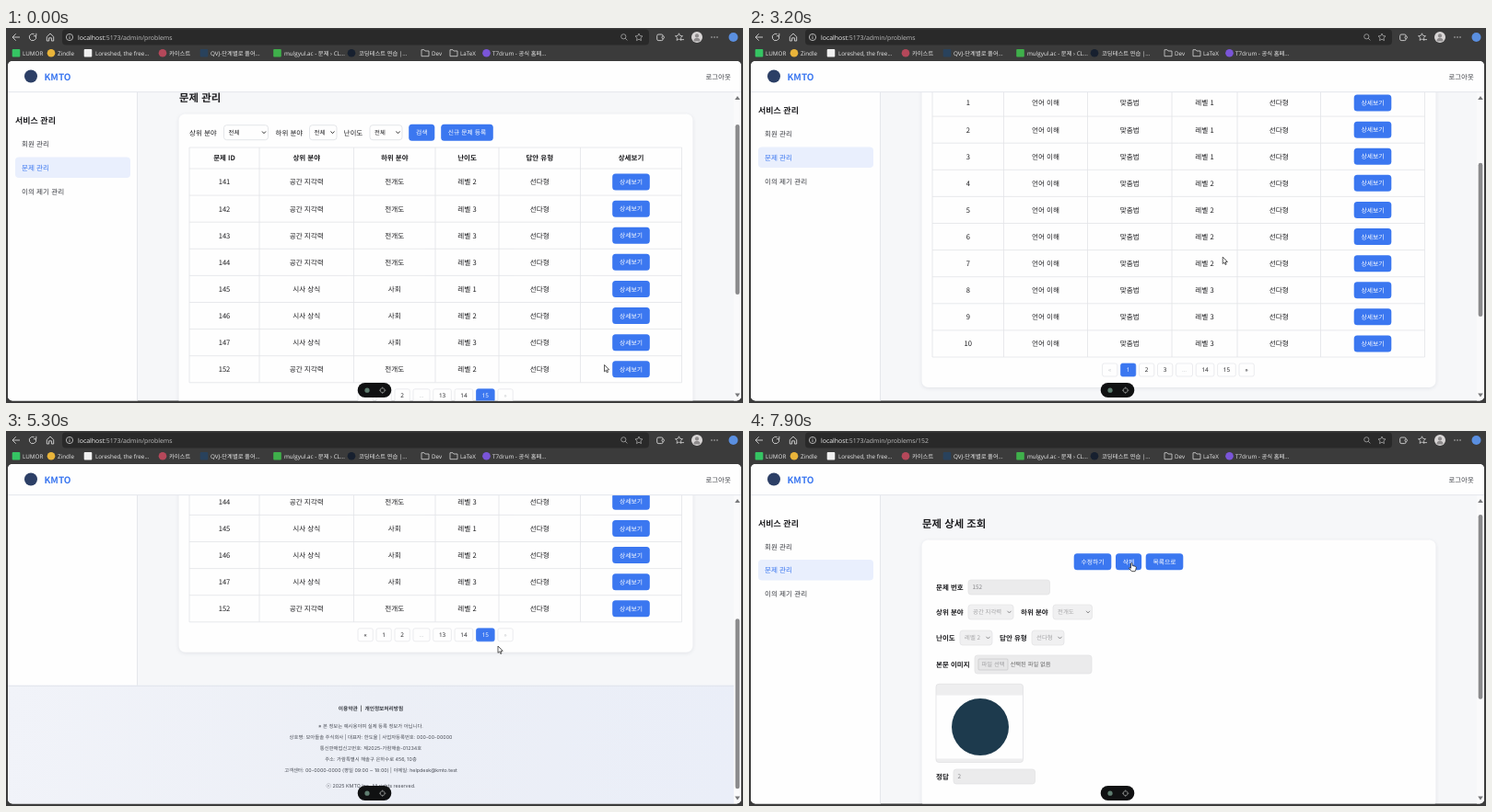
An HTML page with a canvas that plays this animation: 800 px wide and 408 px high, repeating every 8000 ms.

```html
<!DOCTYPE html>
<html lang="ko">
<head>
<meta charset="utf-8">
<title>문제 관리</title>
<style>
html, body { margin: 0; width: 100%; height: 100%; overflow: hidden; background: #3b3b3b; }
canvas { display: block; width: 800px; height: 408px; }
</style>
</head>
<body>
<canvas id="stage" width="800" height="408"></canvas>
<script>
const ctx = document.getElementById('stage').getContext('2d');
ctx.textRendering = 'geometricPrecision'; // keeps fractional glyph advances
const LOOP = 8000;
const PAGE_FONT = '"Noto Sans CJK KR", "Noto Sans CJK JP", "Noto Sans CJK", "Noto Sans", sans-serif';
const UI_FONT = '"Open Sans", "Noto Sans CJK KR", "Noto Sans CJK", sans-serif';
const FOOT_FONT = 'Inter, "Noto Sans CJK KR", "Noto Sans CJK", sans-serif';
const BLUE = '#3b77f0', INK = '#1c1c1f', LINE = '#e2e4e8', PAPER = '#fefefe';
const TAU = Math.PI * 2;

let hot = []; // clickable areas of the current picture

// ---------- drawing helpers ----------
function text(s, x, y, size, o = {}) {
  ctx.font = `${o.weight || 400} ${size}px ${o.font || PAGE_FONT}`;
  ctx.textAlign = o.align || 'left';
  ctx.fillStyle = o.color || INK;
  ctx.fillText(s, x, y + size * 0.385);
}

function box(x, y, w, h, r, fill, stroke, lw = 0.7) {
  ctx.beginPath();
  ctx.roundRect(x, y, w, h, r);
  if (fill) { ctx.fillStyle = fill; ctx.fill(); }
  if (stroke) { ctx.strokeStyle = stroke; ctx.lineWidth = lw; ctx.stroke(); }
}

function rect(x, y, w, h, fill) {
  ctx.fillStyle = fill;
  ctx.fillRect(x, y, w, h);
}

function disc(x, y, r, fill, stroke, lw = 1) {
  ctx.beginPath();
  ctx.arc(x, y, r, 0, TAU);
  if (fill) { ctx.fillStyle = fill; ctx.fill(); }
  if (stroke) { ctx.strokeStyle = stroke; ctx.lineWidth = lw; ctx.stroke(); }
}

function poly(points, stroke, lw = 1, fill, close) {
  ctx.beginPath();
  points.forEach(([x, y], i) => i ? ctx.lineTo(x, y) : ctx.moveTo(x, y));
  if (close) ctx.closePath();
  if (fill) { ctx.fillStyle = fill; ctx.fill(); }
  if (stroke) { ctx.strokeStyle = stroke; ctx.lineWidth = lw; ctx.stroke(); }
}

function star(x, y, r, color) {
  const pts = Array.from({ length: 10 }, (_, i) => {
    const a = -Math.PI / 2 + i * Math.PI / 5, d = i % 2 ? r * 0.48 : r;
    return [x + d * Math.cos(a), y + d * Math.sin(a)];
  });
  poly(pts, color, 0.8, null, true);
}

function button(label, x, y, w) {
  const area = [x - 0.3, y - 9, w + 0.6, 18];
  box(...area, 3.5, BLUE);
  text(label, x + w / 2, y, 6.8, { color: '#fff', align: 'center', weight: 500 });
  hot.push(area);
}

function select(label, x, y, w, off) {
  box(x, y - 8, w, 16, 3, off ? '#f0f0f1' : PAPER, off ? '#e2e2e4' : '#d9dbe0');
  text(label, x + 5, y, 6.4, { color: off ? '#a5a5a7' : INK });
  poly([[x + w - 6.5, y - 1.2], [x + w - 4.5, y + 1], [x + w - 2.5, y - 1.2]], off ? '#8c8c8e' : '#333', 1);
}

function input(value, x, y, w) {
  box(x, y - 8, w, 16, 3, '#ebebec', '#e1e1e3');
  text(value, x + 4.5, y, 6.4, { color: '#858588' });
}

function card(top, bottom) {
  ctx.save();
  ctx.shadowColor = 'rgba(40,50,80,.1)';
  ctx.shadowBlur = 4;
  ctx.shadowOffsetY = 1;
  box(187.5, top, 558, bottom - top, 7, PAPER);
  ctx.restore();
}

// ---------- pages ----------
const lastRows = [141, 142, 143, 144, 145, 146, 147, 152].map((id, i) => {
  const news = i > 3 && i < 7;
  return [id, news ? '시사 상식' : '공간 지각력', news ? '사회' : '전개도', '레벨 ' + '23331232'[i]];
});
const firstRows = Array.from({ length: 10 }, (_, i) =>
  [i + 1, '언어 이해', '맞춤법', '레벨 ' + '1112222333'[i]]);

const pages = {
  last: {
    url: '/admin/problems', rows: lastRows,
    cols: [199, 275, 377.5, 466, 535, 623.5, 733.5],
    nav: ['«', '1', '2', '…', '13', '14', '15', '»'], navX: 382, active: '15', dim: '»'
  },
  first: {
    url: '/admin/problems', rows: firstRows,
    cols: [199, 276.5, 367.5, 459, 530, 620.5, 733.5],
    nav: ['«', '1', '2', '3', '…', '14', '15', '»'], navX: 383.5, active: '1', dim: '«'
  },
  detail: { url: '/admin/problems/152' }
};
const ROW = 29.1, ROWS_TOP = 178;
for (const p of Object.values(pages)) {
  p.end = p.rows ? ROWS_TOP + p.rows.length * ROW + 69 : 437.5;
  p.max = p.end - 272;
}

function drawList(p) {
  text('문제 관리', 188, 101, 11.4, { weight: 700 });
  const bottom = ROWS_TOP + p.rows.length * ROW;
  card(118.5, bottom + 33);

  const fy = 138.7;
  text('상위 분야', 199, fy, 7.5);
  select('전체', 236.5, fy, 48);
  text('하위 분야', 292.5, fy, 7.5);
  select('전체', 329.5, fy, 29.5);
  text('난이도', 366.5, fy, 7.5);
  select('전체', 395, fy, 35);
  button('검색', 437.5, fy, 27.5);
  button('신규 문제 등록', 472.5, fy, 56);

  const mid = i => (p.cols[i] + p.cols[i + 1]) / 2;
  ['문제 ID', '상위 분야', '하위 분야', '난이도', '답안 유형', '상세보기'].forEach((s, i) =>
    text(s, mid(i), 166.5, 7.5, { weight: 700, align: 'center' }));
  p.rows.forEach((row, i) => {
    const y = ROWS_TOP + (i + 0.5) * ROW;
    [...row, '선다형'].forEach((s, c) => text(String(s), mid(c), y, 7.6, { align: 'center' }));
    button('상세보기', mid(5) - 20, y, 40);
  });
  for (let i = -1; i <= p.rows.length; i++) {
    const y = i < 0 ? 155 : ROWS_TOP + i * ROW;
    poly([[199, y], [733.5, y]], LINE, 0.8);
  }
  p.cols.forEach(x => poly([[x, 155], [x, bottom]], LINE, 0.8));

  let x = p.navX;
  const ny = bottom + 14;
  p.nav.forEach(s => {
    const on = s === p.active;
    const w = s === '…' ? 18 : s.length > 1 ? 19.7 : 16.3;
    box(x, ny - 7, w, 14, 2, on ? BLUE : PAPER, on ? BLUE : LINE);
    const faint = s === '…' || s === p.dim;
    text(s, x + w / 2, ny, 6.4, { align: 'center', font: UI_FONT, color: on ? '#fff' : faint ? '#c4c6ca' : INK });
    hot.push([x, ny - 7, w, 14]);
    x += w + 3.7;
  });
}

function drawDetail() {
  const label = (s, x, y) => text(s, x, y, 7.5, { weight: 600 });
  text('문제 상세 조회', 188, 101, 11.4, { weight: 700 });
  card(118.5, 409.5);
  button('수정하기', 353, 142.3, 40);
  button('삭제', 398.3, 142.3, 27.5);
  button('목록으로', 431, 142.3, 40);

  label('문제 번호', 203, 170);
  input('152', 238, 170, 88.5);
  label('상위 분야', 203, 197);
  select('공간 지각력', 238, 197, 49, true);
  label('하위 분야', 295, 197);
  select('전개도', 330, 197, 42.5, true);
  label('난이도', 203, 225);
  select('레벨 2', 229, 225, 35, true);
  label('답안 유형', 272, 225);
  select('선다형', 307, 225, 35, true);

  label('본문 이미지', 203, 254);
  box(245, 244, 127, 20, 3, '#ebebec', '#e1e1e3');
  box(249, 248, 32, 12, 1, '#e6e6e7', '#c6c6c8');
  text('파일 선택', 265, 254, 6.3, { color: '#a0a0a2', align: 'center' });
  text('선택된 파일 없음', 283.5, 254, 6.3, { color: '#666' });

  box(203, 275.3, 94.5, 85.2, 3, '#eeeeef', '#dfdfe1');
  rect(203.5, 287.5, 93.5, 69, PAPER);
  disc(251, 322, 31, '#1d3a4d');

  label('정답', 203, 376);
  input('2', 222, 376, 88.5);
}

function drawSidebar(shift) {
  text('서비스 관리', 10, 101 + shift, 9, { weight: 700 });
  box(10, 140.6 + shift, 125, 22.4, 4, '#e9effd');
  ['회원 관리', '문제 관리', '이의 제기 관리'].forEach((s, i) => {
    const y = 126.3 + i * 25.7 + shift;
    text(s, 17, y, 7.6, { color: i === 1 ? BLUE : '#3a3c42', weight: i === 1 ? 500 : 400 });
    hot.push([10, y - 11, 125, 22]);
  });
}

const footLines = [
  ['※ 본 정보는 예시용이며 실제 등록 정보가 아닙니다.', 44],
  ['상호명: 모아들솔 주식회사 | 대표자: 한도율 | 사업자등록번호: 000-00-00000', 56],
  ['통신판매업신고번호: 제2025-가람해솔-01234호', 68],
  ['주소: 가람특별시 해솔구 은하수로 456, 10층', 80],
  ['고객센터: 00-0000-0000 (평일 09:00 ~ 18:00) | 이메일: helpdesk@kmto.test', 92],
  ['ⓒ 2025 KMTO Inc. All rights reserved.', 109.5]
];

function drawFooter(y) {
  const g = ctx.createLinearGradient(2, y, 790, y + 133);
  g.addColorStop(0, '#f1f3f9');
  g.addColorStop(0.5, '#eceff6');
  g.addColorStop(1, '#eaeef8');
  rect(2, y, 788, 140, g);
  rect(2, y, 788, 0.8, '#dce0e8');
  text('이용약관  |  개인정보처리방침', 396, y + 25.3, 5.7, { weight: 600, align: 'center', font: FOOT_FONT, color: '#33363d' });
  footLines.forEach(([s, dy]) =>
    text(s, 396, y + dy, 5.35, { align: 'center', font: FOOT_FONT, color: '#474b54' }));
}

function drawScrollbar(p, scroll) {
  rect(790, 70, 8, 336, '#fafafb');
  const h = 301 * 332 / (332 + p.max);
  box(791.7, 91 + (301 - h) * scroll / p.max, 4.6, h, 2.3, '#8b8b8d');
  poly([[791.2, 78], [794, 74], [796.8, 78]], null, 0, '#77787a', true);
  poly([[791.2, 397.5], [794, 401.5], [796.8, 397.5]], null, 0, '#77787a', true);
}

function drawHeader() {
  rect(2, 36, 796, 34, PAPER);
  rect(2, 69.3, 796, 0.8, '#dfe2e8');
  disc(27, 52.5, 7, '#2c3f66');
  text('KMTO', 41.5, 53, 10, { weight: 700, color: BLUE });
  text('로그아웃', 759.5, 53, 7.4, { color: '#3c3e44' });
}

function drawPill() {
  box(381.7, 386, 36.6, 16, 8, '#101112');
  disc(392, 394.2, 2.6, '#5f7d70');
  disc(408.7, 394.2, 2.5, null, '#8b8d8c', 0.8);
  for (let i = 0; i < 4; i++) {
    const c = Math.cos(i * TAU / 4), s = Math.sin(i * TAU / 4);
    poly([[408.7 + 1.6 * c, 394.2 + 1.6 * s], [408.7 + 3.7 * c, 394.2 + 3.7 * s]], '#8b8d8c', 0.8);
  }
}

// ---------- browser chrome ----------
const bookmarks = [
  ['LUMOR', 18, 11, '#35c463', true], ['Zindle', 56, 49, '#e9b43a'],
  ['Loreshed, the free...', 97, 89, '#f0f0f0', true], ['카이스트', 177, 170, '#b5485a'],
  ['QVJ-단계별로 풀어...', 222, 215, '#29425c', true], ['mulgyul.ac - 문제 › CL...', 302, 294.5, '#3fb04b', true],
  ['코딩테스트 연습 |...', 383, 375, '#17202f'], ['Dev', 462, 455], ['LaTeX', 493, 486],
  ['T7drum - 공식 홈페...', 528, 521.5, '#7a55d8']
];

function drawChrome(url) {
  const c = '#d6d6d6';
  rect(0, 0, 800, 408, '#3b3b3b');
  box(61, 1.5, 637, 17, 4, '#292929');

  poly([[15, 10], [7, 10]], c, 0.9);
  poly([[10.7, 6.3], [7, 10], [10.7, 13.7]], c, 0.9);
  ctx.beginPath();
  ctx.arc(29, 10, 3.7, -0.4, 5.2);
  ctx.stroke();
  poly([[32.8, 5.8], [32.8, 8.7], [29.9, 8.7]], c, 0.9);
  poly([[44.3, 9.5], [48, 6], [51.7, 9.5], [51.7, 14], [49.4, 14], [49.4, 10.8], [46.6, 10.8], [46.6, 14], [44.3, 14]], c, 0.9, null, true);
  disc(69, 10, 3.6, null, c, 0.8);
  rect(68.6, 9.4, 0.8, 2.6, c);
  rect(68.6, 7.8, 0.8, 0.8, c);

  text('localhost', 78, 10, 6.9, { font: UI_FONT, color: '#f0f0f0' });
  const w = ctx.measureText('localhost').width;
  text(':5173' + url, 78 + w, 10, 6.9, { font: UI_FONT, color: '#c0c0c0' });

  disc(670.3, 9.3, 2.6, null, '#aaa', 0.8);
  poly([[672.2, 11.2], [674.4, 13.4]], '#aaa', 0.8);
  star(687, 10.2, 4.2, '#aaa');
  box(706.7, 7, 6.4, 6.6, 1.5, null, c, 0.9);
  disc(713.2, 10.2, 1.3, '#3b3b3b', c, 0.8);
  star(730.5, 10, 4.2, c);
  poly([[732.5, 12.6], [736, 12.6]], c, 0.8);
  disc(750, 10, 6, '#d9d6d6');
  disc(750, 8.4, 2.1, '#8e8b8c');
  ctx.beginPath();
  ctx.arc(750, 14.4, 3.6, Math.PI, TAU);
  ctx.fill();
  [766, 769, 772].forEach(x => disc(x, 10, 0.7, c));
  disc(789.5, 10, 5, '#5a8fe0');

  bookmarks.forEach(([s, x, ix, color, square]) => {
    if (!color) {
      poly([[ix - 4, 23.7], [ix - 1, 23.7], [ix, 25], [ix + 4, 25], [ix + 4, 30.7], [ix - 4, 30.7]], c, 0.8, null, true);
    } else if (square) {
      box(ix - 4.3, 22.9, 8.6, 8.6, 1, color);
    } else {
      disc(ix, 27.2, 4.3, color);
    }
    text(s, x, 27.2, 6.3, { font: UI_FONT, color: '#eaeaea' });
  });
}

// ---------- pointer ----------
function drawPointer(x, y, hand) {
  ctx.save();
  ctx.translate(x, y);
  ctx.lineJoin = 'round';
  if (hand) {
    ctx.translate(-1, -1.5);
    poly([[0, 0.6], [0.8, 0], [1.6, 0.6], [1.7, 3], [5, 3.8], [5.8, 4.8], [5.4, 7.4], [4.6, 9.2], [1, 9.2], [-2, 5.8], [-1.6, 5], [0, 5.8]],
      '#222', 0.8, '#fff', true);
  } else {
    poly([[0, 0], [0, 7.4], [1.7, 5.9], [2.8, 8.4], [4, 7.9], [2.9, 5.5], [5.2, 5.3]], '#333', 0.8, '#fff', true);
  }
  ctx.restore();
}

// ---------- time ----------
const ease = u => u * u * (3 - 2 * u);

function track(keys, t) {
  let i = 0;
  while (i < keys.length - 2 && t >= keys[i + 1][0]) i++;
  const a = keys[i], b = keys[i + 1];
  const u = ease(Math.min(1, Math.max(0, (t - a[0]) / (b[0] - a[0]))));
  return a.slice(1).map((v, k) => v + (b[k + 1] - v) * u);
}

const pointerKeys = [
  [0, 649.5, 366.5], [250, 671, 372], [550, 671, 372], [1100, 528, 326], [1900, 528, 326],
  [2500, 455, 116], [2900, 455, 116], [3400, 546, 320.5], [3900, 546, 320.5], [4350, 521, 218],
  [4600, 521, 218], [4900, 534, 234], [5350, 534, 234], [6000, 664, 342.5], [6400, 664, 342.5],
  [7400, 415.5, 145], [8000, 415.5, 145]
];
const scrollKeys = [
  [0, 25], [3000, 25], [3500, 266], [4500, 266], [4501, 208], [5250, 208],
  [5750, 52], [6600, 52], [7000, 0], [8000, 0]
];
const route = [[0, 'last'], [500, 'detail'], [2850, 'first'], [4500, 'last'], [6350, 'detail']];

function draw(t) {
  const p = pages[route.filter(r => r[0] <= t).pop()[1]];
  // whole-pixel scrolling keeps edges and text crisp
  const scroll = Math.min(Math.round(track(scrollKeys, t)[0]), p.max);
  const [px, py] = track(pointerKeys, t);

  drawChrome(p.url);
  ctx.save();
  ctx.beginPath();
  ctx.roundRect(2, 36, 796, 369.5, 5);
  ctx.clip();
  rect(2, 36, 796, 370, '#f6f7f9');

  hot = [];
  rect(2, 70, 140.5, p.end - scroll - 70, PAPER);
  rect(142.2, 70, 0.8, p.end - scroll - 70, '#e0e3e8');
  drawSidebar(Math.min(0, p.end - 438 - scroll));
  const fixed = hot;

  hot = [];
  ctx.save();
  ctx.translate(0, -scroll);
  p.rows ? drawList(p) : drawDetail();
  ctx.restore();
  const moved = hot.map(([x, y, w, h]) => [x, y - scroll, w, h]);

  drawFooter(p.end - scroll);
  drawScrollbar(p, scroll);
  drawHeader();
  drawPill();
  ctx.restore();

  const hand = [...fixed, ...moved].some(([x, y, w, h]) => px > x && px < x + w && py > y && py < y + h);
  drawPointer(px, py, hand);
}

const start = performance.now();
function tick() {
  draw((performance.now() - start) % LOOP);
  requestAnimationFrame(tick);
}
tick();
</script>
</body>
</html>
```
